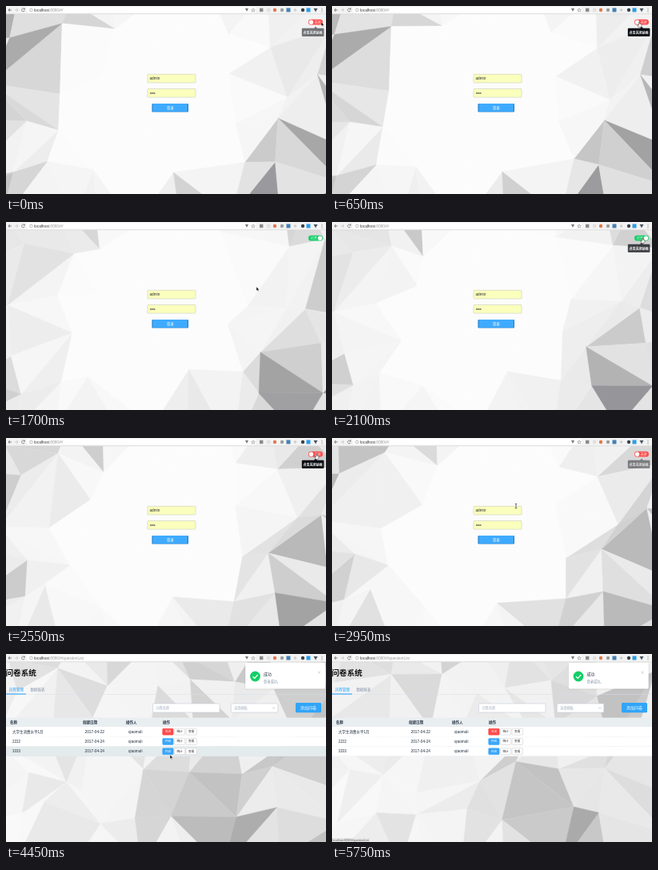
Recreate the animation shown at these times as an HTML page. Size 400 by 235 pixels, loop 5800 ms.

```html
<!DOCTYPE html>
<html>
<head>
<meta charset="utf-8">
<style>
html, body { margin: 0; width: 100%; height: 100%; overflow: hidden; background: #fcfcfc; }
svg { display: block; width: 400px; height: 235px; }
text { font-family: "Liberation Sans", "Noto Sans CJK SC", "Noto Sans CJK", sans-serif; dominant-baseline: central; white-space: pre; }
</style>
</head>
<body>
<svg id="stage" viewBox="0 0 400 235" xmlns="http://www.w3.org/2000/svg"></svg>
<script>
const LOOP = 5800, STEP = 50, LOGGED_IN = 4200;
const COLS = 9, ROWS = 5, CELL = 56;
const ROW_TOP = 91, ROW_HEIGHT = 12.3;

// Pointer moves: start, end, x, y
const moves = [
  [0, 200, 240, 194], [200, 300, 190, 150], [550, 650, 384, 20], [950, 1250, 313, 81],
  [1800, 2050, 388, 20], [2700, 2950, 230, 85], [2950, 3100, 206, 90], [3350, 3600, 372, 22],
  [3600, 3900, 205, 126], [4800, 5050, 368, 66], [5050, 5350, 32, 42], [5400, 5700, 372, -12]
];
// Times between which the switch is hovered
const hovers = [[-200, -45], [550, 1000], [2025, 2895]];

const clamp = v => Math.min(1, Math.max(0, v));
const mix = (a, b, k) => a + (b - a) * k;
const smooth = k => k * k * (3 - 2 * k);
const rand = n => { const v = Math.sin(n * 127.1 + 3.7) * 43758.5453; return v - Math.floor(v); };

const rect = (x, y, w, h, fill, more = "") =>
  `<rect x="${x}" y="${y}" width="${w}" height="${h}" fill="${fill}" ${more}/>`;
const text = (x, y, size, fill, str, more = "") =>
  `<text x="${x}" y="${y}" font-size="${size}" fill="${fill}" ${more}>${str}</text>`;
const path = (d, stroke, width = .8) =>
  `<path d="${d}" fill="none" stroke="${stroke}" stroke-width="${width}"/>`;
const dot = (x, y, r, fill) => `<circle cx="${x}" cy="${y}" r="${r}" fill="${fill}"/>`;
const group = (id, body) => `<g id="${id}">${body}</g>`;
const mid = 'text-anchor="middle"', bold = 'font-weight="bold"';

function toolbar() {
  return rect(0, 0, 400, 10, "#f3f3f3") + rect(0, 9.6, 400, .6, "#d2d2d2") +
    rect(26, 1.3, 286, 7.2, "#fff", 'rx="1"') +
    path("M7 5H3M4.8 3L3 5L4.8 7", "#666") + path("M11 5H15M13.2 3L15 5L13.2 7", "#c4c4c4") +
    path("M23.2 3.8A2 2 0 1 0 23.4 5.8M23.4 2.6V4.2H21.8", "#666", .7) +
    `<circle cx="31.4" cy="5" r="1.8" fill="none" stroke="#777" stroke-width=".5"/>` +
    `<text x="35" y="5" font-size="4.8" fill="#333">localhost<tspan fill="#999">:8080/#/<tspan id="route"></tspan></tspan></text>` +
    `<path d="M299 3H303L301 7Z" fill="#777"/>` +
    path("M309 2.8L309.7 4.4L311.3 4.5L310.1 5.6L310.5 7.2L309 6.3L307.5 7.2L307.9 5.6L306.7 4.5L308.3 4.4Z", "#777", .5) +
    rect(317, 2.8, 4.4, 4.4, "#8b8b8b") + rect(326, 2.8, 4.4, 4.4, "#e0e0e0") +
    dot(336, 5, 2.2, "#e2774c") + dot(345, 5, 2.2, "#9a9f9f") +
    rect(350.5, 2.5, 5, 5, "#4581b5") + dot(361.5, 5, 1.8, "#cfcfcf") +
    dot(371, 5, 2.2, "#3b4148") + rect(375.5, 2.5, 5, 5, "#2c9de8") +
    `<path d="M384.5 3H389.5L387 7.5Z" fill="#4a5560"/>` +
    [3, 5, 7].map(y => dot(395, y, .6, "#777")).join("");
}

function toggle(id, color, label, knobX, labelX) {
  return group(id, rect(378, 16.8, 18, 6.8, color, 'rx="3.4"') + dot(knobX, 20.2, 2.7, "#fff") +
    text(labelX, 20.2, 4, "#fff", label, mid));
}

function login() {
  const field = y => rect(177, y, 60, 10.6, "#faffbd", 'stroke="#d3d5c4" stroke-width=".7" rx=".8"');
  return field(85.3) + text(179.5, 90.7, 4.7, "#222", "admin") +
    field(103.5) + [0, 1, 2, 3].map(i => dot(180.7 + i * 1.7, 109, .72, "#222")).join("") +
    rect(182.4, 122, 45.6, 10.5, "#2584d2", 'rx="1"') + rect(183.6, 122, 43.2, 9.8, "#3fabff", 'id="enter"') +
    text(205.2, 127.2, 4.3, "#fff", "登录", mid) +
    toggle("off", "#ff4949", "关闭", 381.5, 389.5) + toggle("on", "#13ce66", "打开", 392.5, 385) +
    group("tip", rect(369.8, 27.8, 27.6, 10.2, "#0b0e14", 'rx="1"') +
      `<path d="M385 28L387 25.6L389 28Z" fill="#0b0e14"/>` +
      text(383.6, 33, 4, "#fff", "点击关闭动画", `${mid} ${bold}`));
}

function row([name, date, label, color], i) {
  const y = ROW_TOP + i * ROW_HEIGHT, c = y + ROW_HEIGHT / 2;
  const button = (x, str, fill, ink, edge) =>
    rect(x, c - 4, 13.4, 8, fill, `rx="1" stroke="${edge}" stroke-width=".5"`) + text(x + 6.7, c, 3.7, ink, str, mid);
  return rect(0, y, 400, ROW_HEIGHT, "#fff", 'class="row"') + rect(0, y + 12, 400, .4, "#dfe6ec") +
    text(8, c, 4.5, "#1f2d3d", name) + text(98.5, c, 4.8, "#1f2d3d", date) + text(153, c, 4.7, "#1f2d3d", "qiaomuli") +
    button(195.7, label, color, "#fff", color) +
    button(210.4, "统计", "#fff", "#333", "#c4c4c4") + button(225, "查看", "#fff", "#333", "#c4c4c4");
}

function list() {
  const rows = [
    ["大学生消费水平1月", "2017-04-22", "关闭", "#ff4949"],
    ["2222", "2017-04-24", "开启", "#3aa6f8"],
    ["3333", "2017-04-24", "开启", "#3aa6f8"]
  ];
  const heads = [[5, "名称"], [96, "创建日期"], [150, "操作人"], [196, "操作"]];
  const box = (x, w, str) => rect(x, 62, w, 11, "#fff", 'rx="1" stroke="#c3ccd8" stroke-width=".6"') +
    text(x + 4, 67.6, 4.2, "#a3afbf", str);
  return text(-.5, 23.5, 9.6, "#111", "问卷系统", bold) +
    text(4, 44, 4.5, "#20a0ff", "问卷管理") + text(30.5, 44, 4.5, "#8492a6", "数据报表") +
    rect(0, 50, 400, .5, "#d5dde6") + rect(0, 49.5, 25, 1, "#20a0ff") +
    box(183.5, 83.5, "问卷名称") + box(281.3, 58.5, "选择模板") + path("M333 66.7L334.7 68.4L336.4 66.7", "#a3afbf", .6) +
    rect(362, 61, 32, 12.2, "#31a5f8", 'rx="1.2"') + text(378, 67.1, 5, "#fff", "添加问卷", mid) +
    rect(0, 79.6, 400, 11.4, "#e9eef1") + heads.map(([x, s]) => text(x, 85.4, 4.5, "#1f2d3d", s, bold)).join("") +
    rows.map(row).join("") +
    group("note", rect(295, 11.5, 101.5, 33, "#000", 'opacity=".08" rx="1.5"') + rect(295.7, 11, 100, 32.5, "#fff", 'rx="1"') +
      dot(308, 28, 6.4, "#13ce66") + path("M305 28.2L307.3 30.4L311.2 26", "#fff", 1.2) +
      text(318.5, 25, 5, "#1f2d3d", "成功") + text(318.5, 34, 4.2, "#8492a6", "登录成功。") +
      path("M386.5 21.5L389.7 24.7M389.7 21.5L386.5 24.7", "#b5bfca", .6)) +
    group("status", rect(0, 230, 47, 5, "#e6e6e6") + text(.5, 232.7, 3.5, "#666", "localhost:8080/#/questionList"));
}

const cursors = group("arrow", `<path d="M0 0V5L1.2 4L2 5.7L2.9 5.3L2.1 3.7H3.7Z" fill="#111" stroke="#fff" stroke-width=".4"/>`) +
  group("hand", `<path d="M-.6 0H.6V2L3 2.8V4.6L2.2 6.4H-1L-2.6 3.6L-.6 4Z" fill="#fff" stroke="#333" stroke-width=".5"/>`) +
  group("beam", path("M-1.2 -2.7H1.2M0 -2.7V2.7M-1.2 2.7H1.2", "#333", .7));

const stage = document.getElementById("stage");
stage.innerHTML = rect(0, 0, 400, 235, "#fcfcfc") + group("mesh", "<polygon stroke-width='.4'/>".repeat(COLS * ROWS * 2)) +
  group("login", login()) + group("list", list()) + toolbar() + cursors;

const el = id => document.getElementById(id);
const show = (id, yes) => el(id).setAttribute("display", yes ? "inline" : "none");
const move = (id, x, y) => el(id).setAttribute("transform", `translate(${x} ${y})`);
const facets = [...el("mesh").children], rowBacks = [...document.querySelectorAll(".row")];

// Grid point, jittered once and then drifting with the clock.
function vertex(col, row, clock) {
  const n = row * (COLS + 1) + col;
  const sway = (base, k) => base + 30 * (rand(n + k) - .5) + 12 * Math.sin(clock * 2.4 + 6.28 * rand(n + k + 200));
  return [sway((col - .9) * CELL, 0), sway((row - .3) * CELL, 500)];
}

// Light falls on the middle of the login page and on the left of the list.
function shade(points, n, clock, inside) {
  const u = (points.reduce((s, p) => s + p[0], 0) / 3 - 190) / 200;
  const v = (points.reduce((s, p) => s + p[1], 0) / 3 - 110) / 125;
  const far = Math.hypot(u, v * .6) + .25 * u * v;
  const edge = inside ? clamp(.7 + u * .5) : clamp((far - .55) / .4);
  const tilt = .5 + .5 * Math.sin(6.28 * rand(n + 900) + clock * 1.4);
  const corner = 1 + Math.max(0, u * v);
  const g = 252 - edge * corner * (12 + 46 * tilt * tilt);
  return `rgb(${g},${g},${g + Math.max(0, 165 - g) * .3})`;
}

function drawMesh(t, inside) {
  const clock = inside ? 7 + clamp((t - LOGGED_IN) / 550) : clamp((t - 500) / 2400) * 2.4;
  for (let n = 0; n < facets.length; n++) {
    const cell = n >> 1, col = cell % COLS, row = Math.floor(cell / COLS);
    const corner = (dx, dy) => vertex(col + dx, row + dy, clock);
    const quad = [corner(0, 0), corner(1, 0), corner(1, 1), corner(0, 1)];
    const first = (rand(cell + 70) > .5 ? 1 : 0) + (n & 1) * 2;
    const points = [0, 1, 2].map(i => quad[(first + i) % 4]);
    const color = shade(points, n, clock, inside);
    facets[n].setAttribute("points", points.join(" "));
    facets[n].setAttribute("fill", color);
    facets[n].setAttribute("stroke", color);
  }
}

function pointer(t) {
  let x = 394, y = 20;
  for (const [from, to, nx, ny] of moves) {
    const k = smooth(clamp((t - from) / (to - from)));
    x = mix(x, nx, k);
    y = mix(y, ny, k);
  }
  return [x, y];
}

function draw(t) {
  const inside = t >= LOGGED_IN, on = t >= 700 && t < 2500;
  const [x, y] = pointer(t);
  const within = (left, top, w, h) => x > left && x < left + w && y > top && y < top + h;
  drawMesh(t, inside);
  show("login", !inside);
  show("list", inside);
  el("route").textContent = inside ? "questionList" : "";

  show("on", on);
  show("off", !on);
  const fades = hovers.map(([a, b]) => clamp(Math.min((t - a) / 100, 1 - (t - b) / 100)));
  el("tip").setAttribute("opacity", Math.max(...fades));
  const over = within(182, 121, 46, 12), pressed = t >= 3950 && t < 4050;
  el("enter").setAttribute("fill", pressed ? "#1d8ce0" : over ? "#4db3ff" : "#3fabff");

  show("note", t >= 4300);
  move("note", 106 * Math.exp((4300 - t) / 44), 0);
  show("status", t >= 5250);
  rowBacks.forEach((back, i) =>
    back.setAttribute("fill", within(0, ROW_TOP + i * ROW_HEIGHT, 400, ROW_HEIGHT) ? "#e4ebed" : "#fff"));

  const typing = !inside && (within(176, 84, 62, 13) || within(176, 103, 62, 12));
  const pressing = !inside && (over || within(377, 16, 15, 8));
  const shape = typing ? "beam" : pressing ? "hand" : "arrow";
  for (const id of ["arrow", "hand", "beam"]) {
    show(id, id === shape && y > 9);
    move(id, x, y);
  }
}

const start = performance.now();
function tick() {
  const t = (performance.now() - start) % LOOP;
  draw(Math.floor(t / STEP) * STEP);
  requestAnimationFrame(tick);
}
tick();
</script>
</body>
</html>
```
